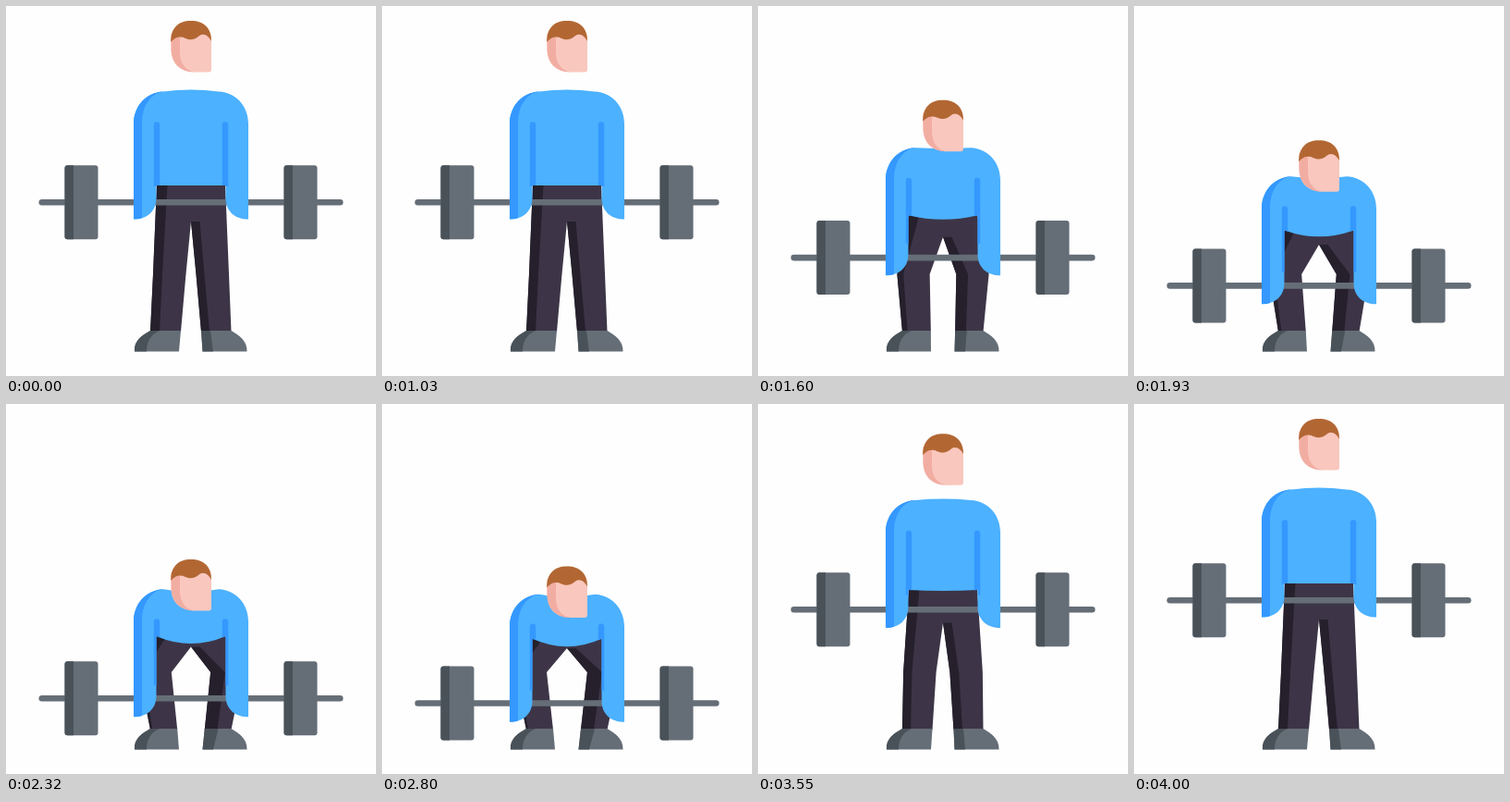
Animation of 400 by 400 pixels, one loop 4.03 s. Source, as an HTML page:

```html
<!DOCTYPE html>
<html lang="en">
<head>
<meta charset="utf-8">
<title>Deadlift</title>
<style>
  html, body { margin: 0; width: 100%; height: 100%; overflow: hidden; background: #fefefe; }
  svg { display: block; width: 100vw; height: 100vh; }
  .pants { fill: #3d3547; }
  .pants-dark { fill: #25202c; }
  .steel { fill: #656e77; }
  .steel-dark { fill: #4a5259; }
  .shirt { fill: #4cb1ff; }
  .shirt-dark { fill: #3498ff; }
  .skin { fill: #f9c7be; }
  .skin-dark { fill: #f2ada2; }
  .hair { fill: #b26733; }
</style>
</head>
<body>
<svg viewBox="0 0 400 400">
  <defs>
    <clipPath id="shirtClip"><path id="shirtEdge"/></clipPath>
    <g id="plate">
      <rect class="steel" y="-40" width="36" height="80" rx="3"/>
      <path class="steel-dark" d="M3-40H9.5V40H3Q0 40 0 37V-37Q0-40 3-40Z"/>
    </g>
  </defs>

  <path id="legs" class="pants"/>
  <path id="legShade" class="pants-dark"/>
  <path id="shoes" class="steel"/>
  <path id="shoeShade" class="steel-dark"/>

  <g id="barbell">
    <rect class="steel" x="35.5" y="-3.3" width="329" height="6.6" rx="3.3"/>
    <use href="#plate" x="63.5"/>
    <use href="#plate" x="300.5"/>
  </g>

  <path id="shirt" class="shirt"/>
  <g clip-path="url(#shirtClip)">
    <path id="sleeveShade" class="shirt-dark"/>
    <path id="creases" class="shirt-dark"/>
  </g>

  <g id="head">
    <path class="skin" d="M178.500 36Q178.500 18 200 18T222 36V68.500Q222 71.500 219 71.500H203Q178.500 70 178.500 46Z"/>
    <path class="skin-dark" d="M178.500 30H188V50C188 62 194 70 204 71.500H203C188 71 178.500 61 178.500 46Z"/>
    <path class="hair" d="M178.300 39C178 24 186 16 200 16S222.300 24 222 38C219 32 213 28 208 33C203 37 199 37 194 35C188 32 182 34 178.300 39Z"/>
  </g>
</svg>

<script>
const LOOP = 4030, REST = 1030, STEP = 30;

// time, head drop, speed in px per ms
const DROP = [
  [1030, 0, 0], [1570, 80, .2], [2080, 141, .07], [2320, 152, .032], [2680, 160, 0],
  [3160, 121, -.25], [3280, 86, -.32], [3700, 2, -.012], [4000, 0, 0]
];

const el = id => document.getElementById(id);
const setPath = (id, d) => el(id).setAttribute("d", d);
const moveY = (id, y) => el(id).setAttribute("transform", `translate(0 ${y})`);
const mix = (a, b, k) => a + (b - a) * k;
const poly = (...pts) => "M" + pts.map(p => p.join(" ")).join("L") + "Z";

function dropAt(t) {
  const i = DROP.findIndex(k => k[0] > t);
  if (i < 1) return 0;
  const [t0, y0, v0] = DROP[i - 1], [t1, y1, v1] = DROP[i];
  const d = t1 - t0, u = (t - t0) / d, w = 1 - u;
  return y0 * w * w * (1 + 2 * u) + y1 * u * u * (3 - 2 * u) + d * u * w * (v0 * w - v1 * u);
}

// The bar leads and the legs trail slightly on the way up.
const lagAt = t => t > 2860 && t < 3700 ? Math.sin((t - 2860) / 840 * Math.PI) ** 2 : 0;

function drawLegs(q, waist) {
  const crotch = 233 + 31 * q, knee = 290, ankle = 351;
  const kneeOut = mix(159, 143, q), kneeIn = mix(194.5, 178, q), ankleIn = mix(189, 185, q);
  const shadeKnee = mix(214.5, 238, q), shadeAnkle = mix(220, 229, q);

  setPath("legs", poly(
    [163, waist], [237, waist], [400 - kneeOut, knee], [243.5, ankle + 1],
    [400 - ankleIn, ankle + 1], [400 - kneeIn, knee], [200, crotch],
    [kneeIn, knee], [ankleIn, ankle + 1], [156, ankle + 1], [kneeOut, knee]));
  setPath("legShade",
    poly([163, waist], [174.5, waist], [mix(169, 147, q), knee],
      [mix(166, 158, q), ankle + 1], [156, ankle + 1], [kneeOut, knee]) +
    poly([200, crotch], [209.5, crotch], [shadeKnee, knee],
      [shadeAnkle, ankle + 1], [400 - ankleIn, ankle + 1], [400 - kneeIn, knee]));
  setPath("shoes",
    `M156 351H${ankleIn}L187 373.500H139C138 362 147 356 156 351Z` +
    `M${400 - ankleIn} 351H243.500C252 356 261 362 260.500 373.500H212.500Z`);
  setPath("shoeShade",
    "M156 351H166C156 355 152 364 152 373.500H139C138 362 147 356 156 351Z" +
    `M${400 - ankleIn} 351H${shadeAnkle + 1}L224 373.500H212.500Z`);
}

function drawShirt(p, q) {
  const top = 92.5 + 115.5 * p - 2 * p, side = top + 35;
  const cuff = 230.5 + 113.5 * p;
  const hem = 194 + 60 * q, belly = 194 + 77 * q;
  const neck = top - 4 + 10 * p;

  const edge = `M138 ${cuff}V${side}C138 ${side - 19} 151 ${top + 1} 170 ${top}` +
    `Q200 ${neck} 230 ${top}C249 ${top + 1} 262 ${side - 19} 262 ${side}V${cuff}` +
    `C248 ${cuff} 237.500 ${cuff - 8} 237.500 ${cuff - 23}V${hem}` +
    `Q200 ${belly} 162.500 ${hem}V${cuff - 23}C162.500 ${cuff - 8} 152 ${cuff} 138 ${cuff}Z`;
  setPath("shirt", edge);
  setPath("shirtEdge", edge);
  setPath("sleeveShade",
    `M137 ${cuff}V${top - 3}H170V${top}C156 ${top + 2} 147 ${side - 19} 147 ${side}V${cuff}Z`);

  const start = 125.5 + 112.5 * p, end = 195 + 115 * p;
  const crease = x => `M${x} ${end}V${start + 3}a3.200 3.200 0 0 1 6.400 0V${end}Z`;
  setPath("creases", crease(159.8) + crease(233.8));
}

function draw(t) {
  const drop = dropAt(t), lag = lagAt(t);
  const p = drop / 160, q = p + .05 * lag;
  drawLegs(q, 193 + 60 * q);
  moveY("barbell", 212.3 + 111.5 * p - 4.5 * lag);
  drawShirt(p, q);
  moveY("head", drop);
}

function tick(now) {
  const t = now % LOOP;
  draw(t < REST ? 0 : REST + Math.floor((t - REST) / STEP) * STEP);
  requestAnimationFrame(tick);
}

draw(0);
requestAnimationFrame(tick);
</script>
</body>
</html>
```
